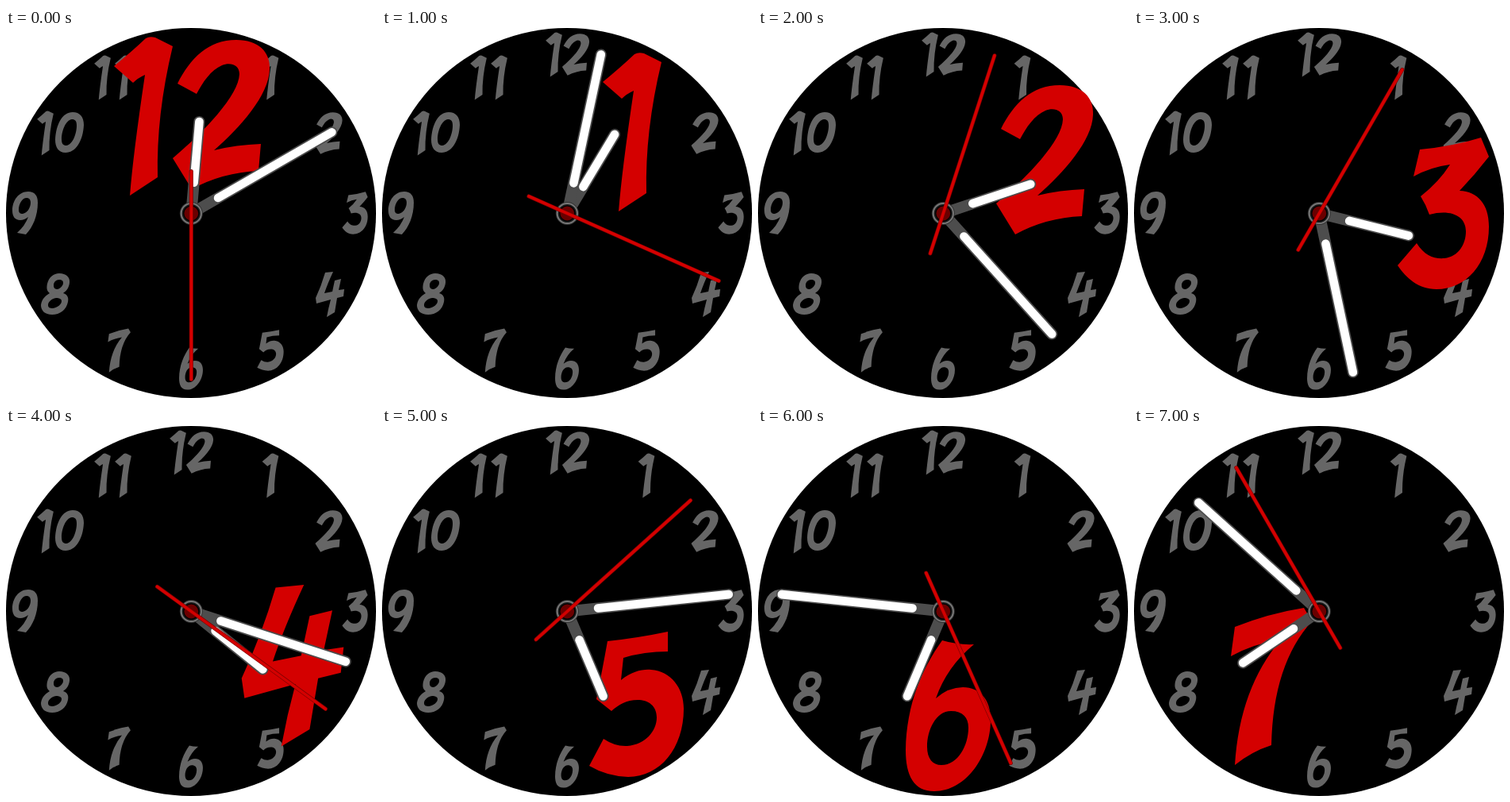
Animation of 466 by 466 pixels, one loop 8000 ms. Source, as an HTML page:

```html
<!DOCTYPE html>
<html lang="en">
<head>
<meta charset="utf-8">
<title>Clock</title>
<style>
html, body { margin: 0; width: 100%; height: 100%; overflow: hidden; background: #fff; }
svg { display: block; width: 100vw; height: 100vh; }
line { stroke-linecap: round; }
</style>
</head>
<body>
<svg viewBox="0 0 466 466">
  <circle cx="233" cy="233" r="233"/>
  <g id="small" fill="#666" fill-rule="evenodd"></g>
  <g id="big" fill="#d40000" fill-rule="evenodd"></g>
  <g id="hands"></g>
</svg>
<script>
// Each digit: outline, its centre, and the factor that brings it to full size.
const K = 3.57;
const digits = {
  0: ["M84,106C93,106 98,112 98,122C97,142 88,157 75,157C66,157 62,150 62,141C63,121 71,106 84,106Z" +
      "M83,115C75,116 70,130 70,140C70,146 72,148 76,148C84,147 89,133 89,123C89,117 87,115 83,115Z", 80, 131.5, K],
  1: ["M278,68Q300,50 318,33Q323,30 330,32L352,43Q331,130 333,208L298,231Q302,180 317,79Q308,83 302,89Z", 315, 131, 1],
  2: ["M216,70C232,38 255,15 290,15C318,15 333,30 332,52C331,85 295,125 262,154Q290,147 321,146L318,180" +
      "Q272,182 234,203L210,164C250,130 293,85 294,58C294,45 281,43 272,47C258,53 248,68 240,83Z", 271, 109, 1],
  3: ["M360,153Q402,149 437,138L447,162Q430,184 410,205C433,206 447,222 447,250C447,297 418,329 381,329" +
      "C358,329 343,315 332,299L356,271C366,287 378,291 391,290C409,288 418,272 418,256C418,236 398,228 372,235" +
      "Q368,223 361,212Q384,194 398,172Q374,175 352,187Z", 389.5, 233.5, 1],
  4: ["M402,308L412,307Q405,322 401,334L411,332L414,318L422,316L419,330L426,329L425,338L417,340L414,358" +
      "L404,364Q406,353 409,342L391,347L390,340Q397,325 402,308Z", 408, 335, K],
  5: ["M284,271Q322,267 360,259L360,284Q330,284 304,292L301,320C315,309 328,306 339,307C364,309 380,330 380,356" +
      "C380,406 350,442 310,442Q283,441 261,428L279,394Q294,404 309,403C332,401 346,384 346,367" +
      "C346,352 335,345 322,345C308,345 298,351 289,359L270,344Q277,310 284,271Z", 320.5, 350.5, 1],
  6: ["M232,270Q252,276 272,275Q238,303 224,343Q240,329 258,329C280,329 293,345 293,370C293,415 262,460 222,460" +
      "C196,460 186,440 186,408C187,350 207,305 232,270Z" +
      "M243,359C224,359 213,383 213,404C213,419 220,427 231,427C252,427 265,402 265,380C265,367 258,359 243,359Z", 239.5, 365, 1],
  7: ["M127,253Q170,236 214,229L224,246Q175,300 173,402Q148,410 127,427Q133,330 185,269Q151,274 122,290Z", 172.5, 327.5, 1],
  8: ["M67,309C76,309 81,314 80,321C79,328 76,331 72,334C78,336 79,340 78,345C76,355 68,361 58,361" +
      "C49,361 44,356 44,349C45,341 50,337 55,334C51,331 51,327 52,322C54,314 60,309 67,309Z" +
      "M67,317C63,317 60,320 60,324C60,328 62,329 65,329C69,328 72,324 72,321C72,318 70,317 67,317Z" +
      "M63,340C57,341 53,345 53,349C53,352 55,353 59,353C65,352 70,348 70,344C70,341 67,340 63,340Z", 62.5, 335, K],
  9: ["M28,206C36,206 40,211 40,220C40,236 34,251 25,260L14,258Q24,249 28,238Q23,242 18,242" +
      "C11,242 8,237 8,230C8,217 16,206 28,206Z" +
      "M26,214C20,214 16,222 16,229C16,233 18,234 21,234C27,233 31,226 31,220C31,216 29,214 26,214Z", 24, 233, K]
};

// Digit centres for every hour on the dial: [digit, x, y]
const dial = [
  [[1, 216.5, 33.5], [2, 244, 33.5]], [[1, 333, 62.5]], [[2, 406.5, 132.5]], [[3, 439.5, 233]],
  [[4, 408, 335]], [[5, 333, 406]], [[6, 233, 429]], [[7, 142.5, 406]], [[8, 62.5, 335]],
  [[9, 24, 233]], [[1, 49.5, 132.5], [0, 80, 131.5]], [[1, 121.5, 62.5], [1, 147.5, 62.5]]
];
const large = [
  [[1, 173, 111], [2, 271, 109]], [[1, 315, 131]], [[2, 361, 166]], [[3, 389.5, 233.5]],
  [[4, 361, 300]], [[5, 320.5, 350.5]], [[6, 239.5, 365]], [[7, 172.5, 327.5]]
];
// Minute and second for each hour shown
const times = [[10, 30], [2, 19], [23, 3], [28, 5], [18, 21], [14, 8], [46, 26], [52, 55]];

const $ = id => document.getElementById(id);

const drawDigit = (scale) => ([n, x, y]) => {
  const [d, cx, cy, k] = digits[n];
  return `<path d="${d}" transform="translate(${x} ${y}) scale(${scale * k}) translate(${-cx} ${-cy})"/>`;
};
const drawHour = (list, scale) => `<g>${list.map(drawDigit(scale)).join("")}</g>`;

const bar = (from, to, width, color) =>
  `<line y1="${-from}" y2="${-to}" stroke="${color}" stroke-width="${width}"/>`;
const hand = (angle, bars) =>
  `<g transform="translate(233.3 233.5) rotate(${angle})">${bars}</g>`;
const whiteHand = (angle, len) =>
  hand(angle, bar(0, len, 14, "#4d4d4d") + bar(39, len, 10.6, "#fff"));

const hub = `<g transform="translate(233.3 233.5)">
  <circle r="14.5" fill="#333"/>
  <circle r="12.6" fill="#1a1a1a" stroke="#777" stroke-width="2"/>
  <circle r="9.5" fill="#6a0000" stroke="#000" stroke-width="1.2"/></g>`;

$("small").innerHTML = dial.map(h => drawHour(h, 1 / K)).join("");
$("big").innerHTML = large.map(h => drawHour(h, 1)).join("");

let shown = -1;
function show(hour) {
  if (hour === shown) return;
  shown = hour;
  [...$("small").children].forEach((g, i) => g.style.display = i === hour ? "none" : "");
  [...$("big").children].forEach((g, i) => g.style.display = i === hour ? "" : "none");
  const [min, sec] = times[hour];
  $("hands").innerHTML =
    whiteHand(hour * 30 + min / 2, 116) +
    whiteHand(min * 6, 204.5) + hub +
    hand(sec * 6, bar(-53, 209, 5, "#800000") + bar(-53, 209, 3.6, "#d40000"));
}

const start = performance.now();
function tick() {
  show(Math.floor((performance.now() - start) / 1000) % times.length);
  requestAnimationFrame(tick);
}
show(0);
tick();
</script>
</body>
</html>
```
